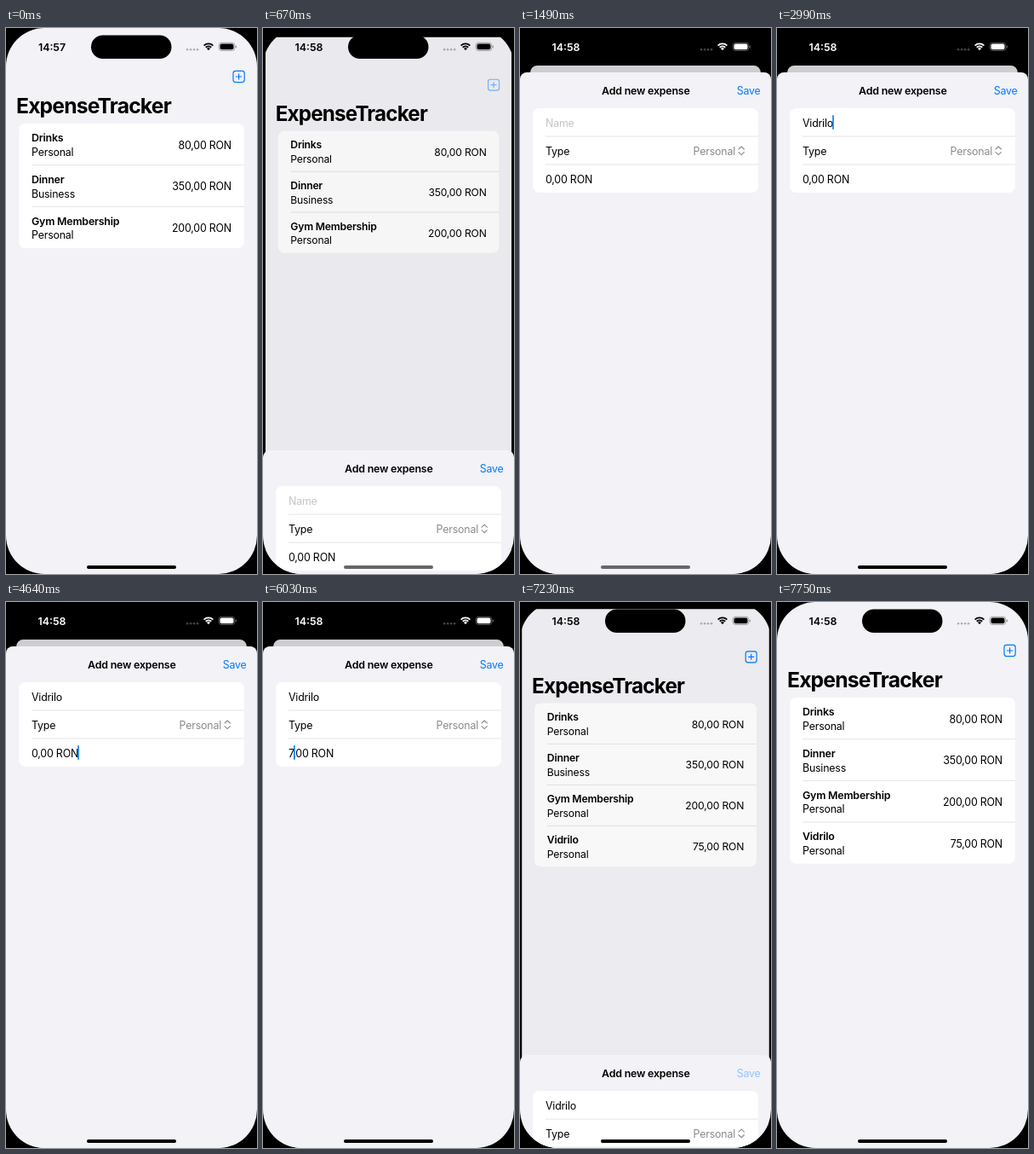
Recreate the animation shown at these times as an HTML page with a canvas. Size 295x640 px, loop 8 s.

```html
<!DOCTYPE html>
<html lang="en">
<head>
<meta charset="utf-8">
<title>Expense tracker</title>
<style>
  html, body { margin: 0; width: 100%; height: 100%; overflow: hidden; background: #000; }
  canvas { display: block; width: 295px; height: 640px; }
</style>
</head>
<body>
<canvas id="stage"></canvas>
<script>
const W = 295, H = 640, LOOP = 8000;
const BLUE = '#007aff', PAPER = '#f2f2f7', LINE = '#dedee1', GREY = '#8a8a8e';
const SHEET_TOP = 52, CARD_TOP = 44, CARD_SHRINK = 0.0814;
const NAME = 'Vidrilo';
const EXPENSES = [
  ['Drinks', 'Personal', '80,00 RON'],
  ['Dinner', 'Business', '350,00 RON'],
  ['Gym Membership', 'Personal', '200,00 RON'],
  [NAME, 'Personal', '75,00 RON'],
];

const OPEN_TICKS = [550, 670, 780, 890, 1000, 1110, 1490];
const CLOSE_TICKS = [7020, 7120, 7230, 7340, 7460, 7750];
// [time, letters typed]
const TYPING = [[0, 0], [2260, 1], [2390, 2], [2620, 4], [2860, 6], [2990, 7]];
// [time, amount, caret index or -1, selected letters]
const AMOUNT = [
  [0, '0,00 RON', -1, 0], [4640, '0,00 RON', 8, 0], [4880, '0,00 RON', 4, 0],
  [5000, '0,00 RON', 2, 0], [5540, '0,00 RON', 1, 0], [5860, '0,00 RON', -1, 1],
  [6030, '7,00 RON', 1, 0], [6580, '75,00 RON', 2, 0], [7020, '75,00 RON', -1, 0],
];

const canvas = document.getElementById('stage');
const ctx = canvas.getContext('2d');
const dpr = window.devicePixelRatio || 1;
canvas.width = W * dpr;
canvas.height = H * dpr;

const clamp = v => Math.max(0, Math.min(1, v));
const latest = (steps, t) => steps.filter(s => s[0] <= t).pop();
const hold = (ticks, t) => ticks.filter(k => k <= t).pop() ?? 0;

// Critically damped spring, 0 to 1; t in ms.
function spring(t) {
  const x = Math.max(0, t) * 0.0173;
  return 1 - (1 + x) * Math.exp(-x);
}

function sheetProgress(t) {
  if (t < 550 || t >= 7750) return 0;
  if (t < 1490) return spring(hold(OPEN_TICKS, t) - 615);
  if (t < 7020) return 1;
  return 1 - spring(hold(CLOSE_TICKS, t) - 7051);
}

function box(x, y, w, h, r, color) {
  ctx.beginPath();
  ctx.roundRect(x, y, w, h, r);
  ctx.fillStyle = color;
  ctx.fill();
}

function setFont(weight = 400, size = 12.4, spacing = -0.2) {
  ctx.font = `${weight} ${size}px Inter, Roboto, sans-serif`;
  ctx.letterSpacing = spacing + 'px';
}

// y is the middle of the capitals.
function text(str, x, y, { color = '#000', weight = 400, size = 12.4, spacing = -0.2, align = 'left' } = {}) {
  setFont(weight, size, spacing);
  ctx.fillStyle = color;
  ctx.textAlign = align;
  ctx.fillText(str, x, y + size * 0.364);
}

function stroke(color, width, ...lines) {
  ctx.beginPath();
  for (const [x, y, ...rest] of lines) {
    ctx.moveTo(x, y);
    for (let i = 0; i < rest.length; i += 2) ctx.lineTo(rest[i], rest[i + 1]);
  }
  ctx.strokeStyle = color;
  ctx.lineWidth = width;
  ctx.stroke();
}

const separator = y => stroke(LINE, 0.8, [30, y, 280, y]);

function textEnd(str) {
  setFont();
  return 30 + ctx.measureText(str).width;
}

const caret = (x, y) => box(x - 0.8, y - 8.5, 1.6, 17, 0.8, BLUE);

function plusButton(alpha) {
  ctx.globalAlpha = alpha;
  ctx.beginPath();
  ctx.roundRect(267, 50.4, 13.2, 13.2, 2.8);
  ctx.strokeStyle = BLUE;
  ctx.lineWidth = 1.2;
  ctx.stroke();
  stroke(BLUE, 1.2, [273.6, 53.4, 273.6, 60.6], [270, 57, 277.2, 57]);
  ctx.globalAlpha = 1;
}

function list(t, p) {
  const scale = 1 - CARD_SHRINK * p;
  const rowH = 48.7, top = 112;
  const rows = EXPENSES.slice(0, t < 7020 ? 3 : 4);
  ctx.save();
  ctx.translate(W / 2, CARD_TOP * p);
  ctx.scale(scale, scale);
  ctx.translate(-W / 2, 0);
  box(0, 0, W, H + 10, p > 0 ? 9 : 0, PAPER);
  plusButton(t < 550 || t >= 7230 ? 1 : t < 7020 ? 0.5 : 0.65);
  text('ExpenseTracker', 12, 91.5, { weight: 700, size: 24.7, spacing: -0.85 });
  box(15, top, 265, rowH * rows.length, 7.5, '#fff');
  rows.forEach(([name, type, amount], i) => {
    const y = top + i * rowH;
    if (i) separator(y);
    text(name, 30, y + 16.7, { weight: 600 });
    text(type, 30, y + 33.5);
    text(amount, 265, y + 25, { align: 'right' });
  });
  ctx.restore();
}

function sheet(t, p) {
  const typed = NAME.slice(0, latest(TYPING, t)[1]);
  const [, amount, caretAt, selected] = latest(AMOUNT, t);
  ctx.save();
  ctx.translate(0, H - (H - SHEET_TOP) * p);
  box(0, 0, W, H, [8, 8, 0, 0], PAPER);
  text('Add new expense', W / 2 + 0.3, 21, { weight: 600, align: 'center' });
  text('Save', 282.5, 21, { color: t < 7020 ? BLUE : '#8fc4fb', align: 'right' });
  box(15, 42, 265, 99, 7.5, '#fff');
  separator(75);
  separator(108);

  text(typed || 'Name', 30, 59, { color: typed ? '#000' : '#c4c4c7' });
  if (t >= 2020 && t < 4520) caret(textEnd(typed), 58.5);

  text('Type', 30, 92);
  text('Personal', 253, 92, { color: GREY, align: 'right' });
  ctx.lineCap = ctx.lineJoin = 'round';
  stroke(GREY, 1.1, [257, 90, 260.2, 87, 263.4, 90], [257, 93.6, 260.2, 96.6, 263.4, 93.6]);
  ctx.lineCap = 'butt';

  if (selected) box(30, 116.5, textEnd(amount.slice(0, selected)) - 30, 17, 0, 'rgba(0,122,255,.2)');
  text(amount, 30, 125);
  if (caretAt >= 0) caret(textEnd(amount.slice(0, caretAt)), 124.5);
  ctx.restore();
}

function statusIcons(color) {
  ctx.globalAlpha = 0.28;
  for (let i = 0; i < 4; i++) box(211.8 + i * 4, 24, 2.6, 2.6, 1.3, color);
  ctx.globalAlpha = 1;

  const from = -Math.PI * 0.75, to = -Math.PI * 0.25;
  ctx.strokeStyle = ctx.fillStyle = color;
  ctx.lineWidth = 1.8;
  for (const r of [4.6, 7.6]) {
    ctx.beginPath();
    ctx.arc(238, 26, r, from, to);
    ctx.stroke();
  }
  ctx.beginPath();
  ctx.moveTo(238, 26.2);
  ctx.arc(238, 26, 2.8, from, to);
  ctx.fill();

  ctx.globalAlpha = 0.4;
  ctx.beginPath();
  ctx.roundRect(250.2, 17.3, 18.6, 9.2, 3);
  ctx.lineWidth = 0.8;
  ctx.stroke();
  box(269.7, 20.4, 1.2, 3, 0.6, color);
  ctx.globalAlpha = 1;
  box(251.5, 18.6, 16, 6.6, 1.9, color);
}

function statusBar(t) {
  const tick = t < 1490 ? hold(OPEN_TICKS, t) : t;
  const level = Math.round(255 * clamp((tick - 720) / 220));
  const light = `rgb(${level},${level},${level})`;
  const clock = t < 380 ? '14:57' : '14:58';
  text(clock, 54, 22, { weight: 600, align: 'center', spacing: 0, color: t < 7230 ? light : '#000' });
  statusIcons(t < 7120 ? light : '#000');
}

function draw(t) {
  const p = sheetProgress(t);
  ctx.setTransform(dpr, 0, 0, dpr, 0, 0);
  box(0, 0, W, H, 0, '#000');
  ctx.save();
  ctx.beginPath();
  ctx.roundRect(0, 0, W, H, 45);
  ctx.clip();
  list(t, p);
  if (p > 0) {
    box(0, 0, W, H, 0, `rgba(0,0,0,${0.15 * p})`);
    sheet(t, p);
  }
  box(100, 8.5, 94.5, 27.5, 13.75, '#000');
  statusBar(t);
  box(95, 630, 105, 4, 2, t >= 550 && t < 2020 ? '#66666a' : '#000');
  ctx.restore();
}

const start = performance.now();
function frame() {
  draw((performance.now() - start) % LOOP);
  requestAnimationFrame(frame);
}
frame();
</script>
</body>
</html>
```
